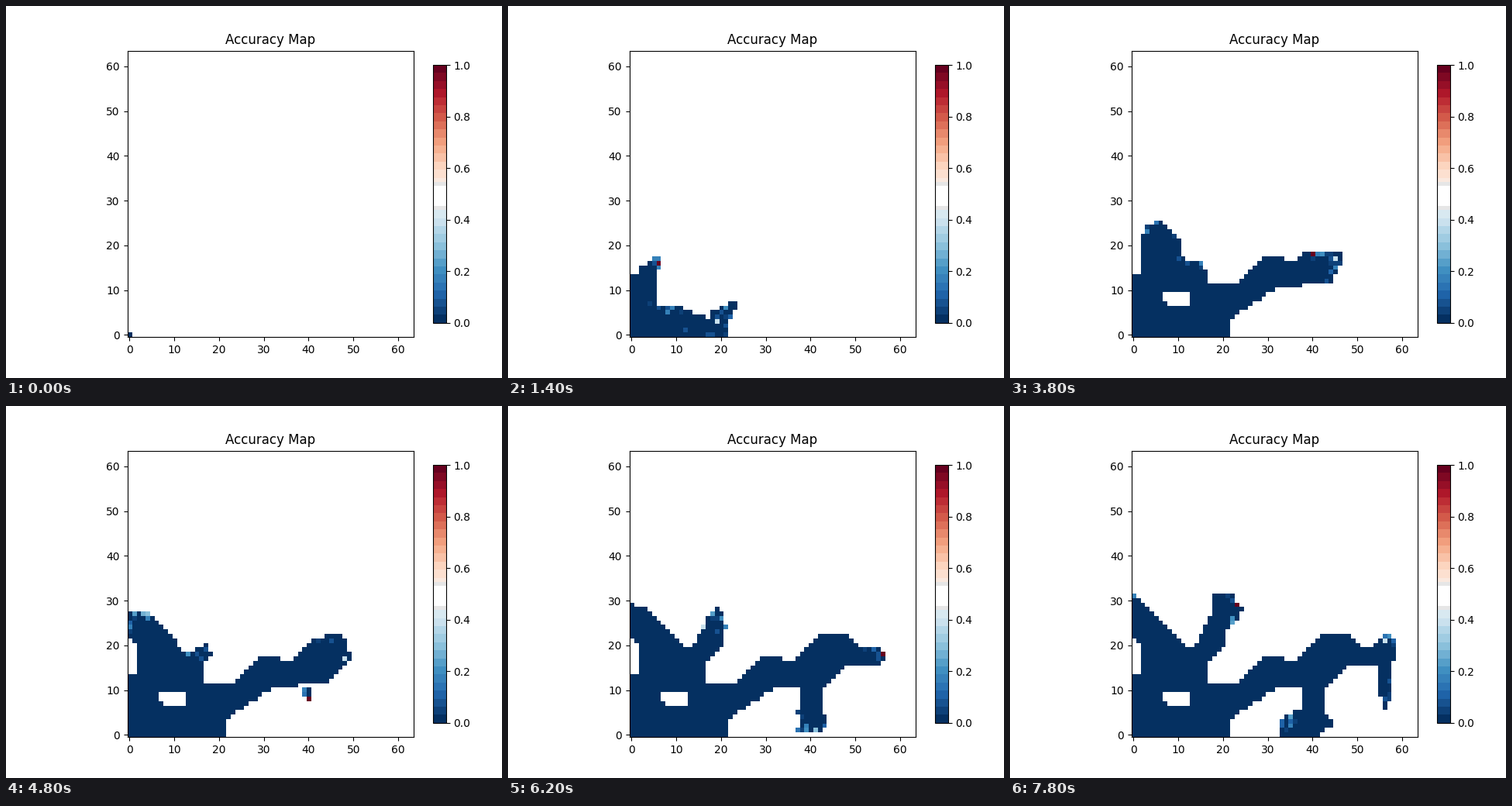
A matplotlib script for the animation above (8000 ms loop, 640 by 480 pixels).

```python
import numpy as np
import matplotlib.pyplot as plt
from matplotlib.animation import FuncAnimation
from matplotlib.colors import ListedColormap
from matplotlib.path import Path

N = 64
FRAMES = 40
STEP_MS = 200
WIDEN = 1.15  # frames a path needs to widen by one cell
FADE = 0.4
SPARKS = 9
W, H = 640, 480

# Cell centres as (x, y) pairs, row by row.
cells = np.stack(np.meshgrid(np.arange(N), np.arange(N)), axis=-1).reshape(-1, 2) + 0.5

# Outlines of the explored region.
body = [(0, 0), (22, 0), (22, 4), (26.5, 7), (32.5, 11), (43.5, 11), (47, 15),
        (49, 16), (58, 16), (58, 19), (54, 20), (51, 20), (48, 23), (43, 23),
        (36.5, 17), (34, 17), (34, 18), (30, 18), (23.8, 12), (17, 12),
        (17, 17), (20.8, 20), (21, 23), (24.4, 27), (24.8, 29), (23, 30),
        (23, 32), (18, 32), (18, 28), (16, 23.5), (13.5, 20), (12.8, 20),
        (1, 31), (1, 32), (0, 32), (0, 23), (2, 21), (2, 14), (0, 14)]
leg = [(38, 12), (38, 6), (35, 5), (33, 4), (33, 0), (41, 0), (44, 2), (45, 3),
       (43, 6), (43, 12)]
tail = [(54, 17), (55, 15), (55, 10), (56, 8), (56, 6), (57, 6), (58, 10),
        (58, 17), (59, 18), (59, 21), (57.6, 23), (56, 23), (54, 20)]
hole = [(7, 10), (7, 8.2), (8.2, 7), (13, 7), (13, 10)]

# Routes the search follows: (x, y, frame of arrival).
routes = [
    [(0.5, 0.5, 0), (4, 2.5, 0.8), (20, 2.5, 3.2), (22, 6, 5.3), (24.5, 8.3, 7),
     (31, 13, 9.5), (41, 14.5, 13), (47, 18.5, 18.5), (50, 18, 24),
     (57.5, 18, 31), (56.7, 6.5, 38.5)],
    [(0.5, 0.5, 0), (3, 12, 3), (6, 17, 6), (6, 18.5, 7), (5, 23, 13),
     (3, 25, 19), (0.5, 28, 24), (0.5, 31.5, 39)],
    [(9, 13, 6.5), (13, 14, 13), (16, 16.5, 19), (18, 21, 24), (20, 29, 31),
     (24, 28.5, 39)],
    [(20, 4, 4.5), (15, 9, 10), (15.5, 13, 13)],
    [(40, 10, 23), (40.5, 8.5, 24), (41, 4, 27), (37, 0.5, 31), (34, 2, 37)],
    [(57.5, 18, 31), (57, 22.5, 38)],
]


def inside(outline):
    return Path(outline).contains_points(cells)


def arrival():
    """Time at the nearest route point plus the time to widen out to the cell."""
    best = np.full(N * N, np.inf)
    time = np.zeros(N * N)
    for route in routes:
        for a, b in zip(np.array(route), np.array(route)[1:]):
            d = b[:2] - a[:2]
            s = np.clip((cells - a[:2]) @ d / (d @ d), 0, 1)
            gap = np.hypot(*(cells - a[:2] - s[:, None] * d).T)
            near = gap < best
            best[near] = gap[near]
            time[near] = (a[2] + s * (b[2] - a[2]) + WIDEN * gap)[near]
    return time


def build_fields():
    """Accuracy of the visited cells: new ones may flare, then fade to zero."""
    region = (inside(body) | inside(leg) | inside(tail)) & ~inside(hole)
    birth = np.minimum(np.ceil(arrival()), FRAMES - 1)
    birth[~region] = FRAMES
    rng = np.random.default_rng(5)
    heat = np.zeros(N * N)
    fields = []
    for k in range(FRAMES):
        heat *= FADE
        if k:
            fresh = rng.permutation(np.flatnonzero(birth == k))[:SPARKS]
            heat[fresh] = rng.uniform(0.04, 0.3, len(fresh))
            heat[fresh[:1]] = 1
        fields.append(np.ma.masked_where(birth > k, heat).reshape(N, N).copy())
    return fields


def stepped_map():
    colors = np.repeat(plt.get_cmap("RdBu_r")(np.linspace(0, 1, 32)), 2, axis=0)
    colors[29:34] = 1
    colors[[28, 34], :3] = 0.9
    return ListedColormap(colors)


def add_axes(x, y, w, h):
    return fig.add_axes([x / W, y / H, w / W, h / H])


fields = build_fields()
fig = plt.figure(figsize=(W / 100, H / 100), dpi=100)
ax = add_axes(156.6, 52.8, 369.6, 369.6)
im = ax.imshow(fields[0], cmap=stepped_map(), vmin=0, vmax=1, origin="lower",
               interpolation="nearest")
ax.set_title("Accuracy Map")
fig.colorbar(im, cax=add_axes(551.2, 71.28, 16.632, 332.64))


def draw(k):
    im.set_data(fields[k])
    return [im]


anim = FuncAnimation(fig, draw, frames=FRAMES, interval=STEP_MS, repeat=True)
plt.show()
```
